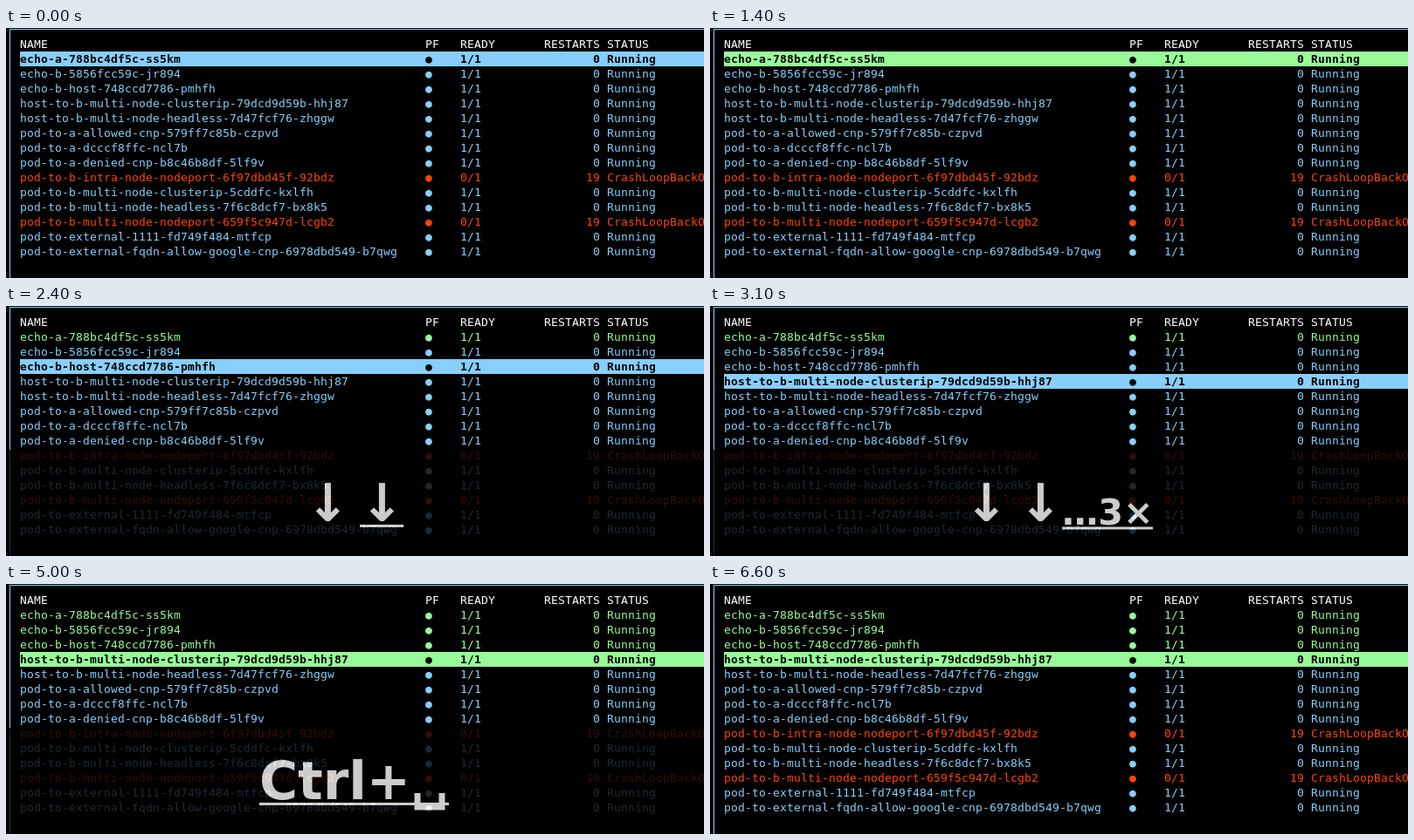
An HTML page for the animation above (6900 ms loop, 799 by 287 pixels).

```html
<!DOCTYPE html>
<html lang="en">
<head>
<meta charset="utf-8">
<title>Pod list with marked rows</title>
<style>
  html, body { margin: 0; width: 100%; height: 100%; overflow: hidden; background: #000; }
  svg { display: block; width: 799px; height: 287px; }
  #table { font: 13px "DejaVu Sans Mono", monospace; }
  #keys { font: bold 60px "DejaVu Sans", sans-serif; fill: #fff; }
  text { white-space: pre; }
</style>
</head>
<body>
<svg viewBox="0 0 799 287">
  <rect width="799" height="287"/>
  <path d="M4 1H799V2H5V287H4Z" fill="#87cefa"/>
  <g id="table"></g>
  <g id="overlay" opacity=".8">
    <rect y="165" width="799" height="122"/>
    <g id="keys"></g>
  </g>
</svg>
<script>
const LOOP = 6900, CELL = 8, ROW = 17, TOP = 27;
const BLUE = '#87cefa', GREEN = '#98fb98', RED = '#ff4500';

const pods = [
  'echo-a-788bc4df5c-ss5km',
  'echo-b-5856fcc59c-jr894',
  'echo-b-host-748ccd7786-pmhfh',
  'host-to-b-multi-node-clusterip-79dcd9d59b-hhj87',
  'host-to-b-multi-node-headless-7d47fcf76-zhggw',
  'pod-to-a-allowed-cnp-579ff7c85b-czpvd',
  'pod-to-a-dcccf8ffc-ncl7b',
  'pod-to-a-denied-cnp-b8c46b8df-5lf9v',
  'pod-to-b-intra-node-nodeport-6f97dbd45f-92bdz',
  'pod-to-b-multi-node-clusterip-5cddfc-kxlfh',
  'pod-to-b-multi-node-headless-7f6c8dcf7-bx8k5',
  'pod-to-b-multi-node-nodeport-659f5c947d-lcgb2',
  'pod-to-external-1111-fd749f484-mtfcp',
  'pod-to-external-fqdn-allow-google-cnp-6978dbd549-b7qwg'
];

// Each entry holds from its time until the next one.
const cursorSteps = [[0, 0], [1800, 1], [2400, 2], [3100, 3]];
const markedSteps = [[0, 0], [500, 1], [5000, 4]];
const keySteps = [
  [0, ''], [400, 'space', true], [600, 'space'], [1400, ''],
  [1800, 'down', true], [1900, 'down'], [2300, 'down2', true],
  [3100, 'down3', true], [3300, 'down3'], [4000, ''],
  [5000, 'ctrl', true], [5200, 'ctrl'], [6000, '']
];

const byId = id => document.getElementById(id);
const text = (x, y, s, extra = '') => `<text x="${x}" y="${y}" ${extra}>${s}</text>`;
const arrow = x => text(x, 246.5, '↓');
const spaceKey = x => `<path d="M${x} 240h7v12.5h21v-12.5h7v19.5h-35z"/>`;

// glyphs, then the underline of the latest key: x, width, y
const keyViews = {
  space: [spaceKey(381), 377, 44, 251],
  down: [arrow(374), 374, 50, 251],
  down2: [arrow(343) + arrow(405), 405, 50, 251],
  down3: [arrow(291) + arrow(353) + text(403, 251.3, '…3×', 'font-size="41.3"'), 403, 104, 253.5],
  ctrl: [text(290, 246.5, 'Ctrl+') + spaceKey(467.5), 290, 217, 251]
};

const stepAt = (steps, t) => steps.filter(s => s[0] <= t).pop();

// Like a terminal, give every character one whole-pixel cell.
function alignToCells() {
  const table = byId('table'), sample = 'n'.repeat(50);
  table.innerHTML = text(0, 0, sample);
  const advance = table.firstChild.getComputedTextLength() / sample.length;
  table.style.letterSpacing = `${CELL - advance}px`;
}

function line(y, name, dot, ready, restarts, status) {
  return text(16, y, name) + text(480, y, dot) + text(520, y, ready) +
    text(680 - CELL * restarts.length, y, restarts) + text(688, y, status);
}

function podRow(name, i, cursor, marked) {
  const failing = name.includes('nodeport');
  const color = i < marked ? GREEN : failing ? RED : BLUE;
  const y = TOP + i * ROW, selected = i === cursor;
  const bar = selected ? `<rect x="16" y="${y}" width="783" height="${ROW}" fill="${color}"/>` : '';
  const cells = failing ? ['0/1', '19', 'CrashLoopBackOff'] : ['1/1', '0', 'Running'];
  return `${bar}<g fill="${selected ? '#000' : color}" font-weight="${selected ? 700 : 400}">` +
    line(y + 13, name, '●', ...cells) + '</g>';
}

function drawTable(cursor, marked) {
  byId('table').innerHTML =
    `<g fill="#fff">${line(23, 'NAME', 'PF', 'READY', 'RESTARTS', 'STATUS')}</g>` +
    pods.map((name, i) => podRow(name, i, cursor, marked)).join('');
}

function drawKeys(key, underlined) {
  byId('overlay').style.display = key ? '' : 'none';
  if (!key) return;
  const [glyphs, x, width, y] = keyViews[key];
  byId('keys').innerHTML = glyphs +
    (underlined ? `<rect x="${x}" y="${y}" width="${width}" height="3"/>` : '');
}

let shown = '';
function render(t) {
  const cursor = stepAt(cursorSteps, t)[1];
  const marked = stepAt(markedSteps, t)[1];
  const [, key, underlined] = stepAt(keySteps, t);
  const state = [cursor, marked, key, underlined].join();
  if (state === shown) return;
  shown = state;
  drawTable(cursor, marked);
  drawKeys(key, underlined);
}

alignToCells();
const start = performance.now();
function tick() {
  render((performance.now() - start) % LOOP);
  requestAnimationFrame(tick);
}
tick();
</script>
</body>
</html>
```
